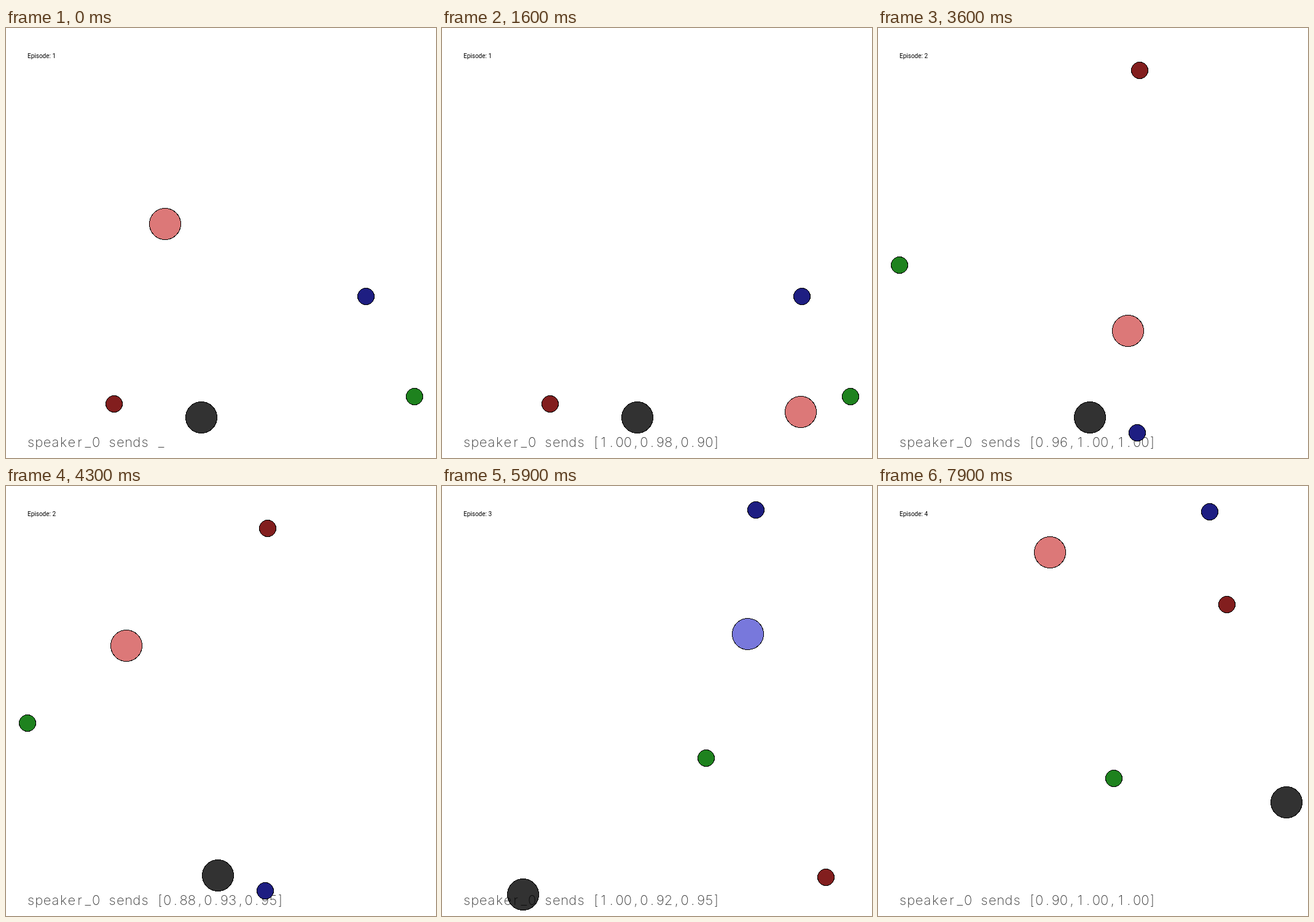
An HTML page for the animation above (8 s loop, 700 by 700 pixels).

```html
<!DOCTYPE html>
<html lang="en">
<head>
<meta charset="utf-8">
<title>Speaker and listener</title>
<style>
  html, body { margin: 0; width: 100%; height: 100%; overflow: hidden; background: #fff; }
  svg { display: block; width: 100vw; height: 100vh; }
  circle { stroke: #000; shape-rendering: crispEdges; }
  #episode { font: 10px Roboto, "Liberation Sans", sans-serif; }
  #message { font: 200 22px Inter, Roboto, sans-serif; fill-opacity: .78; text-anchor: middle; white-space: pre; }
</style>
</head>
<body>
<svg viewBox="0 0 700 700">
  <circle id="speaker" r="25.5" fill="rgb(50,50,50)"/>
  <text id="message" y="682"></text>
  <circle id="listener" r="25.5"/>
  <circle id="red" r="13.5" fill="rgb(130,30,30)"/>
  <circle id="green" r="13.5" fill="rgb(30,130,30)"/>
  <circle id="blue" r="13.5" fill="rgb(30,30,130)"/>
  <text id="episode" x="35" y="49"></text>
</svg>
<script>
const STEP = 100, STEPS = 80, EPISODE_STEPS = 25;
const CENTER = 350, REACH = 315;
const PINK = 'rgb(220,120,120)', VIOLET = 'rgb(120,120,220)';

// The listener eases through a few [step, x, y] key points.
const episodes = [
  { speaker: [318, 634], red: [176, 612], green: [665, 600], blue: [586, 437], color: PINK,
    path: [[0, 259, 319], [9, 551, 593], [16, 584, 625], [24, 620, 650]] },
  { speaker: [345, 634], red: [426, 69], green: [35, 386], blue: [422, 659], color: PINK,
    path: [[0, 696, 588], [4, 592, 579], [11, 407, 493], [18, 196, 260], [24, 166, 251]] },
  { speaker: [132, 665], red: [625, 637], green: [430, 443], blue: [511, 39], color: VIOLET,
    path: [[0, 364, 14], [4, 423, 109], [13, 530, 306], [17, 511, 315], [24, 500, 320]] },
  { speaker: [665, 515], red: [568, 193], green: [384, 476], blue: [540, 42], color: PINK,
    path: [[0, 101, 46], [8, 459, 170]] }
];

const el = id => document.getElementById(id);

function noise(seed) {
  const v = Math.sin(seed * 12.9898 + 4.1) * 43758.5453;
  return v - Math.floor(v);
}

// Each episode opens silent, then the speaker sends three noisy values near 1.
function message(step, local) {
  if (!local) return '_';
  const values = [0, 1, 2].map(i => Math.min(1, 0.88 + 0.2 * noise(step * 3 + i)).toFixed(2));
  return `[${values}]`;
}

// Monotone cubic interpolation along one axis, at rest at both ends.
function along(path, t, axis) {
  const slope = i => (path[i + 1][axis] - path[i][axis]) / (path[i + 1][0] - path[i][0]);
  const tangent = i => {
    if (i === 0 || i === path.length - 1) return 0;
    const a = slope(i - 1), b = slope(i);
    return a * b > 0 ? 2 * a * b / (a + b) : 0;
  };
  let i = 0;
  while (i < path.length - 2 && t >= path[i + 1][0]) i++;
  const span = path[i + 1][0] - path[i][0];
  const u = (t - path[i][0]) / span, w = 1 - u;
  return path[i][axis] * w * w * (1 + 2 * u) + path[i + 1][axis] * u * u * (3 - 2 * u)
    + span * u * w * (w * tangent(i) - u * tangent(i + 1));
}

// Centre each letter in its cell; brackets have narrower cells.
function write(text) {
  let left = 34;
  const centers = [...text].map(c => {
    const width = '[]'.includes(c) ? 10 : 13.25;
    left += width;
    return left - width / 2;
  });
  el('message').setAttribute('x', centers.join(' '));
  el('message').textContent = text;
}

function draw(step) {
  const index = Math.floor(step / EPISODE_STEPS), local = step % EPISODE_STEPS;
  const scene = episodes[index];
  const listener = [1, 2].map(axis => along(scene.path, local, axis));
  // The view widens when the listener strays past its edge.
  const zoom = REACH / Math.max(REACH, ...listener.map(v => Math.abs(v - CENTER)));
  const place = (id, point) => {
    const [x, y] = point.map(v => Math.round(CENTER + (v - CENTER) * zoom));
    el(id).setAttribute('cx', x);
    el(id).setAttribute('cy', y);
  };
  for (const id of ['speaker', 'red', 'green', 'blue']) place(id, scene[id]);
  place('listener', listener);
  el('listener').setAttribute('fill', scene.color);
  el('episode').textContent = `Episode: ${index + 1}`;
  write(`speaker_0 sends ${message(step, local)}`);
}

const start = performance.now();
let shown = 0;
function tick() {
  const step = Math.floor(Math.max(0, performance.now() - start) / STEP) % STEPS;
  if (step !== shown) draw(shown = step);
  requestAnimationFrame(tick);
}
draw(0);
tick();
</script>
</body>
</html>
```
